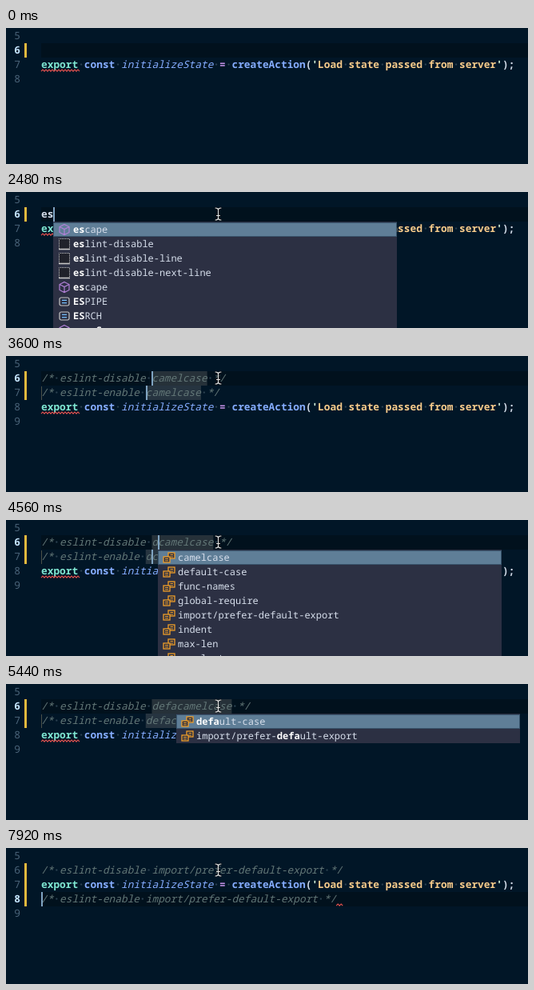
An HTML page for the animation above (8000 ms loop, 653 by 170 pixels).

```html
<!DOCTYPE html>
<html lang="en">
<head>
<meta charset="utf-8">
<title>Editor snippet</title>
<style>
  html, body { margin: 0; width: 100%; height: 100%; overflow: hidden; background: #011627; }
  svg { display: block; }
  text {
    font-family: "Noto Sans Mono", "DejaVu Sans Mono", monospace;
    font-variant-ligatures: none;
    text-rendering: geometricPrecision;
    white-space: pre;
  }
  .code { font-size: 12.82px; font-weight: 600; }
  .code [font-style], .number { font-weight: 500; }
  .item { font-size: 12px; font-weight: 500; fill: #d6deeb; }
  .item .hit { font-weight: 800; fill: #fff; }
</style>
</head>
<body>
<svg width="653" height="170" viewBox="0 0 653 170">
  <g id="editor"></g>
  <g id="pointer" fill="none" stroke-linecap="round">
    <path id="halo" stroke="#000" stroke-width="2.4" opacity=".5"/>
    <path id="beam" stroke="#e6e6e6" stroke-width="1.1"/>
  </g>
</svg>
<script>
const LOOP = 8000, LEFT = 44, CHAR = 7.692, ROW = 18, POPUP_WIDTH = 430;
const $ = id => document.getElementById(id);
const colX = col => LEFT + col * CHAR;
const lineTop = line => 19 + (line - 6) * ROW;
const rect = (x, y, w, h, fill, more = '') =>
  `<rect x="${x}" y="${y}" width="${w}" height="${h}" fill="${fill}" ${more}/>`;
const path = (d, stroke, fill = 'none', width = 1.2) =>
  `<path d="${d}" stroke="${stroke}" fill="${fill}" stroke-width="${width}"/>`;

const EXPORT = [
  ['export', '#7fe6d2'], [' '], ['const', '#86adff'], [' '],
  ['initializeState', '#86adff', true], [' '], ['=', '#c792ea'], [' '],
  ['createAction', '#86adff'], ['(', '#d6deeb'], ["'", '#d9f5dd'],
  ['Load state passed from server', '#f8cb8b'], ["'", '#d9f5dd'], [');', '#d6deeb']
];
const comment = text => [[text, '#637777', true]];
const plain = text => [[text, '#d6deeb']];

const ICONS = {
  cube: path('M0-6.5L6-3.5V3.5L0 6.5L-6 3.5V-3.5ZM-6-3.5L0-.5L6-3.5M0-.5V6.5', '#b180d7'),
  snippet: rect(-6.5, -6.5, 13, 13, '#20222b') +
    '<path d="M-6.5 6V-6.5H6.5V6" fill="none" stroke="#c5c5c5" stroke-width="1" stroke-dasharray="1 1"/>' +
    path('M-7 6.5H7', '#c5c5c5', 'none', 1.6),
  constant: rect(-6, -5, 12, 10, 'none', 'rx="2" stroke="#c5c5c5" stroke-width="1.2"') +
    path('M-3-1.6H3M-3 1.6H3', '#75beff', 'none', 1.4),
  variable: path('M-5-4.5H-7.5V4.5H-5M5-4.5H7.5V4.5H5', '#c5c5c5') +
    path('M1-3L4-2V1L-1 3L-4 2V-1Z', '#75beff', '#75beff', 1) +
    path('M-4-1L-1 0L4-2M-1 0V3', '#2c3043', 'none', .8),
  type: path('M-3-6L1-2.5L-3 1L-7-2.5Z', '#ee9d28', '#ee9d28', 1) +
    path('M0-2H4M-2 1V4H3', '#ee9d28') +
    path('M5-4L7-2L5 0L3-2ZM5 2L7 4L5 6L3 4Z', '#ee9d28', '#ee9d28', .6),
  rule: rect(-1, -6, 8, 7, '#2c3043', 'stroke="#ee9d28" stroke-width="1.3"') +
    rect(-7, -1, 8, 7, '#2c3043', 'stroke="#ee9d28" stroke-width="1.3"') +
    path('M1.5-3.5H5M1.5-1H5M-5 1.5H-1M-5 3.8H-1', '#ee9d28', 'none', 1)
};

// Stars in a label enclose its matched letters.
const star = (label, word) => {
  const at = word ? label.toLowerCase().indexOf(word) : -1;
  return at < 0 ? label
    : `${label.slice(0, at)}*${label.substr(at, word.length)}*${label.slice(at + word.length)}`;
};
const snippets = word => ['eslint-disable', 'eslint-disable-line', 'eslint-disable-next-line']
  .map(label => ['snippet', star(label, word)]);
const wordList = [
  ['cube', '*es*cape'], ...snippets('es'), ['cube', '*es*cape'],
  ['constant', '*ES*PIPE'], ['constant', '*ES*RCH'], ['cube', 'cas*eS*can']
];
const fuzzyList = [
  ['variable', '*E*mail*L*i*s*t*i*ngModal'], ['type', '*E*mail*L*i*s*t*i*ngView'],
  ['constant', 'toggle*E*A*l*erts*S*ubscr*i*ption'],
  ['constant', 'clickBackToEmailDraft*E*d*i*Li*s*tModal']
];
const filtered = word => [
  ...snippets(word), ['constant', '*e*mpty*S*ubmitC*li*ck'], ...fuzzyList
];
const rules = word => ['camelcase', 'default-case', 'func-names', 'global-require',
  'import/prefer-default-export', 'indent', 'max-len', 'no-alert']
  .filter(label => label.includes(word)).map(label => ['rule', star(label, word)]);

const typed = (text, more = {}) => ({
  lines: [plain(text), EXPORT], carets: [[6, text.length]], on: true, popupCol: text.length, ...more
});
const wrapped = (name, more = {}, prefix = 0) => ({
  lines: [comment(`/* eslint-disable ${name} */`), comment(`/* eslint-enable ${name} */`), EXPORT],
  carets: [[6, 18 + prefix], [7, 17 + prefix]], on: true, popupCol: 18 + prefix,
  fields: name.length, changed: 2, squiggles: [[8, 0, 6]], ...more
});
const choosing = (prefix, more = {}) => wrapped(prefix + 'camelcase', more, prefix.length);
const RULE = 'import/prefer-default-export';
const BOTH = [[6, 0, 5], [7, 0, 6]];

// Each step keeps the earlier state except for what it names.
const STEPS = [
  [0, { ...typed(''), on: false, active: 6, changed: 1, fields: 0, selected: 0, items: null,
        detail: false, bulb: false, squiggles: [[7, 0, 6]] }],
  [1520, { on: true }],
  [1920, { on: false }],
  [2240, typed('e')],
  [2320, typed('es')],
  [2480, { items: wordList }],
  [2560, typed('esl')],
  [2640, { items: filtered('esl'), detail: true }],
  [2800, typed('esli')],
  [2880, { items: filtered('esli'), bulb: true, squiggles: [[6, 0, 4], [7, 0, 6]] }],
  [3120, typed('eslin', { squiggles: BOTH })],
  [3200, { items: [...snippets('eslin'), ...fuzzyList] }],
  [3360, { bulb: false }],
  [3600, choosing('', { items: null, detail: false })],
  [3680, { items: rules('') }],
  [4080, { on: false, selected: 1 }],
  [4160, { selected: 2 }],
  [4240, { selected: 3 }],
  [4320, { selected: 2 }],
  [4400, { selected: 1 }],
  [4480, { selected: 0 }],
  [4560, choosing('d')],
  [4640, { items: rules('d') }],
  [4720, choosing('de')],
  [4800, { items: rules('de') }],
  [4880, choosing('def', { items: rules('def') })],
  [4960, choosing('defa')],
  [5040, { items: rules('defa') }],
  [5440, { on: false }],
  [5680, { selected: 1 }],
  [5920, { on: true }],
  [6240, wrapped(RULE, { items: null, selected: 0 }, RULE.length)],
  [6720, { on: false }],
  [7200, { on: true, carets: [[7, 0]], active: 7, fields: 0 }],
  [7680, { on: false }],
  [7920, { on: true, carets: [[8, 0]], active: 8, changed: 3, squiggles: [[8, 48, 1]],
           lines: [comment(`/* eslint-disable ${RULE} */`), EXPORT,
                   comment(`/* eslint-enable ${RULE} */`)] }]
];
let state = {};
const STATES = STEPS.map(([at, patch]) => ({ at, ...(state = { ...state, ...patch }) }));

function codeLine(parts, line) {
  const spans = parts.map(([text, color, italic]) =>
    text.split(/( )/).map(piece => piece === ' '
      ? '<tspan fill="#2b4050">·</tspan>'
      : `<tspan fill="${color}"${italic ? ' font-style="italic"' : ''}>${piece}</tspan>`).join(''));
  return `<text class="code" x="${LEFT}" y="${lineTop(line) + 13.4}">${spans.join('')}</text>`;
}

function squiggle([line, col, length]) {
  const x = colX(col), y = lineTop(line) + 17.2, count = Math.round(length * CHAR / 4);
  return path(`M${x} ${y}` + 'l2 -2.2l2 2.2'.repeat(count), '#ef5350', 'none', 1.1);
}

function popup({ items, popupCol, selected, detail }) {
  const x = Math.round(colX(popupCol)), top = 38;
  let out = rect(x, top - 1, POPUP_WIDTH, items.length * ROW + 1, '#2c3043');
  out += rect(x, top + selected * ROW, POPUP_WIDTH, ROW, '#5f7e97');
  out += rect(x + .5, top + selected * ROW + .5, POPUP_WIDTH - 1, ROW - 1, 'none',
    'stroke="#122d42" stroke-dasharray="1 1"');
  items.forEach(([icon, label], i) => {
    const y = top + 9 + i * ROW;
    const spans = label.split('*').map((s, n) => n % 2 ? `<tspan class="hit">${s}</tspan>` : s);
    out += `<g transform="translate(${x + 14} ${y})">${ICONS[icon]}</g>` +
      `<text class="item" x="${x + 25}" y="${y + 4}">${spans.join('')}</text>`;
  });
  if (detail) {
    out += `<text class="item" x="${x + 142}" y="51" opacity=".7">ESLint disable wrapper (eslint-disa…</text>` +
      `<circle cx="${x + 410}" cy="47.5" r="5" fill="#1b8fdc"/>` +
      path(`M${x + 410} 46.5v4M${x + 410} 44v1.3`, '#fff', 'none', 1.4);
  }
  return out;
}

function drawEditor(s) {
  let out = rect(LEFT, lineTop(s.active), 653 - LEFT, ROW, '#01111d');
  for (let n = 5; n <= 6 + s.lines.length; n++) {
    const look = n === s.active ? 'class="code" fill="#c5e4fd"' : 'class="code number" fill="#4b6479"';
    out += `<text ${look} x="10.3" y="${lineTop(n) + 13.4}">${n}</text>`;
  }
  out += rect(23, 19, 3, ROW * s.changed, '#e2b93d');
  if (s.fields) {
    [[6, 18], [7, 17]].forEach(([line, col]) => {
      out += rect(colX(col), lineTop(line), s.fields * CHAR, ROW, '#7c7c7c', 'opacity=".3"');
    });
    out += rect(LEFT, 38, 1, 17, '#4a5048');
  }
  s.lines.forEach((parts, i) => out += codeLine(parts, 6 + i));
  out += s.squiggles.map(squiggle).join('');
  if (s.on) s.carets.forEach(([line, col]) =>
    out += rect(Math.round(colX(col)), lineTop(line), 2, ROW, '#80a4c2'));
  if (s.items) out += popup(s);
  if (s.bulb) {
    out += '<circle cx="55" cy="6.8" r="5" fill="#f5c526"/>' +
      path('M55 11V6.5M52.5 5.5L55 8L57.5 5.5', '#3a2f10', 'none', 1) +
      rect(53, 11.6, 4, 3.6, '#c5b98a', 'rx="1"');
  }
  $('editor').innerHTML = out;
}

const BEAM = 'M-3.5-7.5Q-.5-7.5 0-5.5Q.5-7.5 3.5-7.5M0-5.5V5.5M-3.5 7.5Q-.5 7.5 0 5.5Q.5 7.5 3.5 7.5M-2 2H2';
$('halo').setAttribute('d', BEAM);
$('beam').setAttribute('d', BEAM);

function movePointer(t) {
  const rest = (1 - Math.min(1, Math.max(0, (t - 800) / 640))) ** 2;
  $('pointer').setAttribute('visibility', t < 800 ? 'hidden' : 'visible');
  $('pointer').setAttribute('transform', `translate(${265.5 + 75 * rest} ${27.5 + 129 * rest})`);
}

let shown;
function render(t) {
  const current = STATES.filter(s => s.at <= t).pop();
  if (current !== shown) drawEditor(shown = current);
  movePointer(Math.floor(t / 80) * 80);
}

const start = performance.now();
function tick() {
  render((performance.now() - start) % LOOP);
  requestAnimationFrame(tick);
}
tick();
</script>
</body>
</html>
```
